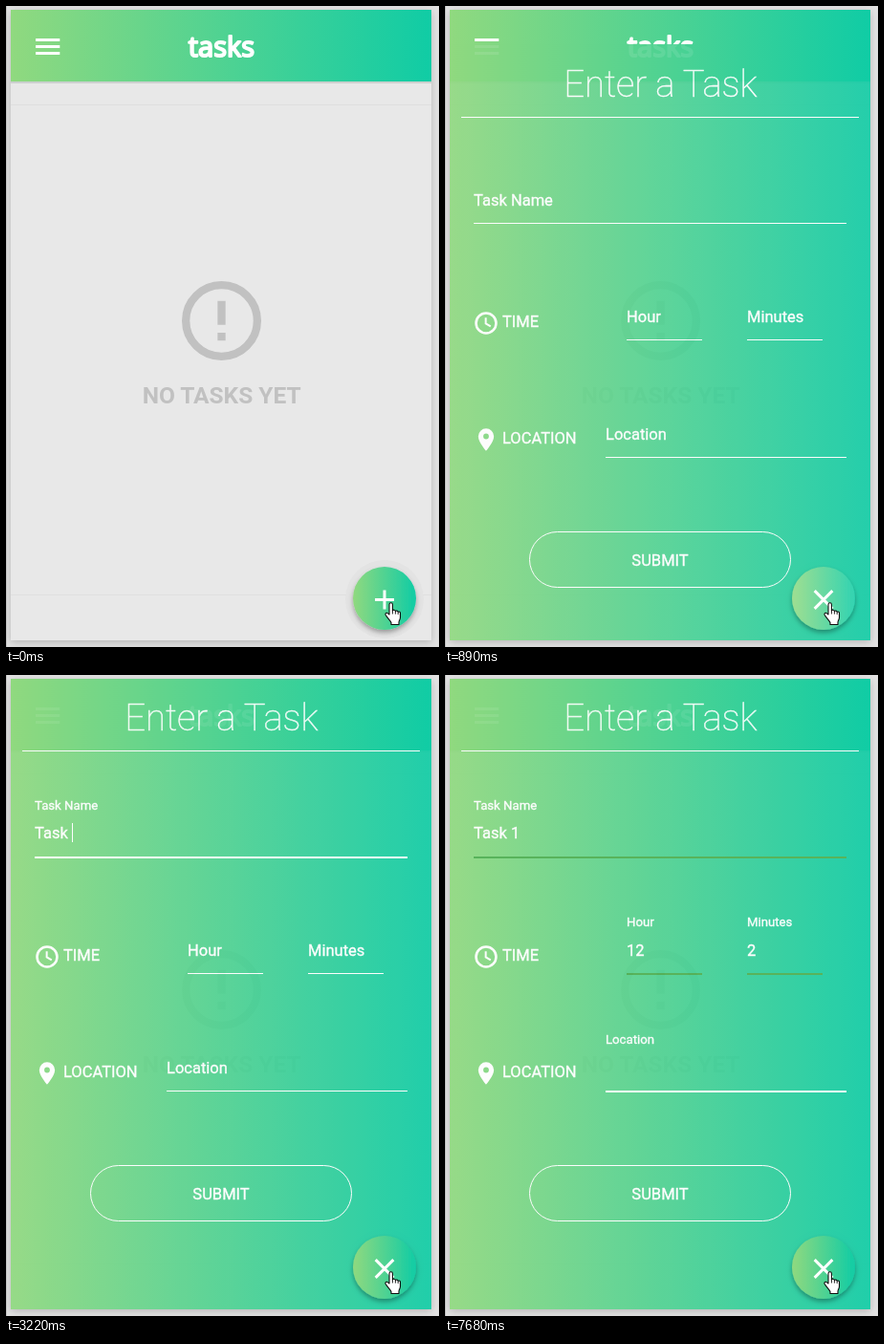
An HTML page that plays this animation: 453x671 px, repeating every 8 s.

```html
<!DOCTYPE html>
<html lang="en">
<head>
<meta charset="utf-8">
<title>Tasks</title>
<style>
  html, body { margin: 0; width: 100%; height: 100%; overflow: hidden; background: #e3e3e3; }
  svg { display: block; width: 453px; height: 671px; }
  text { font: 16.5px Roboto, sans-serif; fill: #fff; white-space: pre; }
  .brand { font: 400 29px "Open Sans", sans-serif; stroke: #fff; stroke-width: 2; stroke-linejoin: round; }
  .empty { font-weight: 700; font-size: 24.5px; fill: #c1c1c1; }
  #sheet text { stroke: #fff; stroke-width: .35px; }
  #sheet .title { font-weight: 100; font-size: 38.2px; stroke-width: .5px; }
  .mid { text-anchor: middle; }
</style>
</head>
<body>
<svg viewBox="0 0 453 671">
  <defs>
    <linearGradient id="green">
      <stop offset="0" stop-color="#90d97f"/>
      <stop offset="1" stop-color="#10cca5"/>
    </linearGradient>
    <filter id="cardShadow" x="-5%" y="-5%" width="110%" height="110%">
      <feDropShadow dx="0" dy="2" stdDeviation="4" flood-opacity=".2"/>
    </filter>
    <filter id="fabShadow" x="-30%" y="-30%" width="160%" height="160%">
      <feDropShadow dx="0" dy="3" stdDeviation="2.5" flood-opacity=".32"/>
    </filter>
    <clipPath id="cardClip"><rect x="5" y="4" width="440" height="660"/></clipPath>
  </defs>

  <rect width="453" height="671" fill="#e3e3e3"/>
  <rect x="5" y="4" width="440" height="660" fill="#e8e8e8" filter="url(#cardShadow)"/>
  <rect width="1" height="671" fill="#c6c6c6"/>

  <g clip-path="url(#cardClip)">
    <path d="M5 103.5H445M5 616.5H445" stroke="#dfdfdf"/>
    <rect x="5" y="79" width="440" height="2" fill="#cbd0ce"/>
    <rect x="5" y="4" width="440" height="75" fill="url(#green)"/>
    <path d="M31 35.5H56.3M31 42.5H56.3M31 49.5H56.3" stroke="#fff" stroke-width="3"/>
    <text class="brand mid" x="225.5" y="52.5">tasks</text>

    <g transform="translate(175.7 279.7) scale(4.15)" fill="#c1c1c1">
      <circle cx="12" cy="12" r="9" fill="none" stroke="#c1c1c1" stroke-width="2"/>
      <path d="M11 7h2v6h-2zM11 15h2v2h-2z"/>
    </g>
    <text class="empty mid" x="225.7" y="416">NO TASKS YET</text>
    <circle cx="396" cy="621" r="41" fill="#e3e3e3"/>

    <g id="sheet">
      <rect x="5" y="3" width="440" height="662" fill="url(#green)"/>
      <text class="title mid" x="225.5" y="57.5">Enter a Task</text>
      <rect x="17" y="79" width="416" height="1" fill="#fff"/>
      <g transform="translate(29 281) scale(1.165)" fill="none" stroke="#fff">
        <circle cx="12" cy="12" r="9" stroke-width="2.2"/>
        <path d="M11.7 7v5.3l4.4 2.6" stroke-width="1.7"/>
      </g>
      <text x="60" y="299">TIME</text>
      <path transform="translate(29 403) scale(1.165)" fill="#fff" fill-rule="evenodd"
        d="M12 2a7 7 0 0 0-7 7c0 5.25 7 13 7 13s7-7.75 7-13a7 7 0 0 0-7-7zm0 4.5a2.5 2.5 0 0 1 0 5 2.5 2.5 0 0 1 0-5z"/>
      <text x="60" y="421">LOCATION</text>
      <g id="fields"></g>
      <rect x="88.5" y="513.5" width="273" height="58" rx="29" fill="none" stroke="#fff"/>
      <text class="mid" x="225" y="549">SUBMIT</text>
    </g>
  </g>

  <circle cx="396" cy="620" r="33" fill="url(#green)" filter="url(#fabShadow)"/>
  <circle id="flash" cx="396" cy="620" r="33" fill="#fff"/>
  <path id="cross" fill="none" stroke="#fff"/>
  <g transform="translate(396 624)" stroke="#111" stroke-width="1.1" stroke-linejoin="round">
    <path fill="#fff" d="M5 13V2.5a1.7 1.7 0 0 1 3.4 0V9a1.6 1.6 0 0 1 3 .6 1.6 1.6 0 0 1 2.8.8 1.4 1.4 0 0 1 2.3 1.3V16c0 2-1.3 3.5-1.5 5v2.5H7v-2C6 19 3 16.5 1.2 13.5.2 11.5 2.4 10.6 3.6 11.8Z"/>
    <path d="M8.4 9v3.5M11.4 9.6v3M14.2 10.4v2.6" stroke-width=".9"/>
  </g>
</svg>
<script>
const LOOP = 8000;
const OPEN_STEPS = [500, 620, 740, 890, 1020, 1170];
const OPEN_START = 490, OPEN_TIME = 650;
const $ = id => document.getElementById(id);

const FIELDS = [
  { label: 'Task Name', x: 30, right: 420, y: 190, focus: 1730, blur: 3750, hidden: [2120, 2270],
    keys: [[2270, 'T'], [2420, 'a'], [2550, 's'], [2670, 'k'], [3220, ' '], [3500, '1']] },
  { label: 'Hour', x: 190, right: 269, y: 312, focus: 3750, blur: 5540, hidden: [4450, 4970],
    keys: [[5120, '1'], [5270, '2']], number: true },
  { label: 'Minutes', x: 316, right: 395, y: 312, focus: 5540, blur: 7040, hidden: [6210, 6490],
    keys: [[6490, '2']], number: true },
  { label: 'Location', x: 168, right: 420, y: 435, focus: 7040, blur: LOOP, hidden: [7680, LOOP], keys: [] }
];

function add(parent, tag, attrs) {
  const el = document.createElementNS('http://www.w3.org/2000/svg', tag);
  set(el, attrs);
  return parent.appendChild(el);
}

function set(el, attrs) {
  for (const name in attrs) el.setAttribute(name, attrs[name]);
}

function buildField(f) {
  const root = $('fields');
  const boxTop = f.y - (f.number ? 34 : 35);
  f.line = add(root, 'rect', { x: f.x, y: f.y, width: f.right - f.x });
  f.name = add(root, 'text', { x: f.x });
  f.name.textContent = f.label;
  f.value = add(root, 'text', { x: f.x, y: boxTop + 16 });
  f.caret = add(root, 'rect', { y: boxTop, width: 1, height: 20, fill: '#fff' });
  if (f.number) {
    f.spinner = add(root, 'g', { transform: `translate(${f.right - 15} ${boxTop})` });
    add(f.spinner, 'rect', { width: 15, height: 20, fill: '#f0f0f0' });
    add(f.spinner, 'path', { d: 'M4 8l3.5-4L11 8zM4 13l3.5 4L11 13z', fill: '#4d4d4d' });
  }
}

const within = (t, from, to) => t >= from && t < to;
const mix = (a, b, p) => a + (b - a) * p;

// Linear interpolation through [time, value] points
function track(t, points) {
  const i = points.findIndex(p => p[0] > t);
  if (i === 0) return points[0][1];
  if (i < 0) return points[points.length - 1][1];
  const [t0, a] = points[i - 1], [t1, b] = points[i];
  return mix(a, b, (t - t0) / (t1 - t0));
}

function drawField(f, t) {
  const lift = t < f.focus ? 0 : t < f.focus + 125 ? 0.5 : 1;
  const focused = within(t, f.focus, f.blur);
  set(f.name, { y: f.y - 18 - 31 * lift });
  f.name.style.fontSize = mix(16.5, 13.2, lift) + 'px';
  set(f.line, { height: lift === 1 ? 2 : 1, fill: t >= f.blur ? '#4caf50' : '#fff' });

  f.value.textContent = f.keys.filter(k => k[0] <= t).map(k => k[1]).join('');
  const end = f.value.textContent ? f.value.getComputedTextLength() : 0;
  const caretOn = focused && !within(t, ...f.hidden);
  set(f.caret, { x: Math.round(f.x + end), opacity: caretOn ? 1 : 0 });
  if (f.spinner) set(f.spinner, { opacity: focused ? 1 : 0 });
}

function drawCross(t) {
  const spread = track(t, [[500, 45], [740, 28], [890, 45]]);
  const turn = track(t, [[500, 45], [740, 0]]);
  const half = track(t, [[500, 10], [740, 13.2]]);
  const arm = deg => {
    const a = deg * Math.PI / 180, dx = half * Math.sin(a), dy = half * Math.cos(a);
    return `M${396 - dx} ${621.5 - dy}L${396 + dx} ${621.5 + dy}`;
  };
  set($('cross'), {
    d: arm(turn + spread) + arm(turn - spread),
    'stroke-width': track(t, [[500, 3], [740, 2], [890, 3]])
  });
}

function render(t) {
  const step = OPEN_STEPS.filter(s => s <= t).pop() || 0;
  const p = Math.min(1, Math.max(0, (step - OPEN_START) / OPEN_TIME));
  const rest = (1 - p) ** 3;
  set($('sheet'), {
    transform: `translate(0 ${Math.round(658 * rest)})`,
    opacity: p ? 0.92 * (1 - 0.33 * rest) : 0
  });
  set($('flash'), { opacity: track(step, [[480, 0], [740, 0.3], [1020, 0]]) });
  drawCross(step);
  FIELDS.forEach(f => drawField(f, t));
}

FIELDS.forEach(buildField);
const start = performance.now();
function tick() {
  render((performance.now() - start) % LOOP);
  requestAnimationFrame(tick);
}
tick();
</script>
</body>
</html>
```
